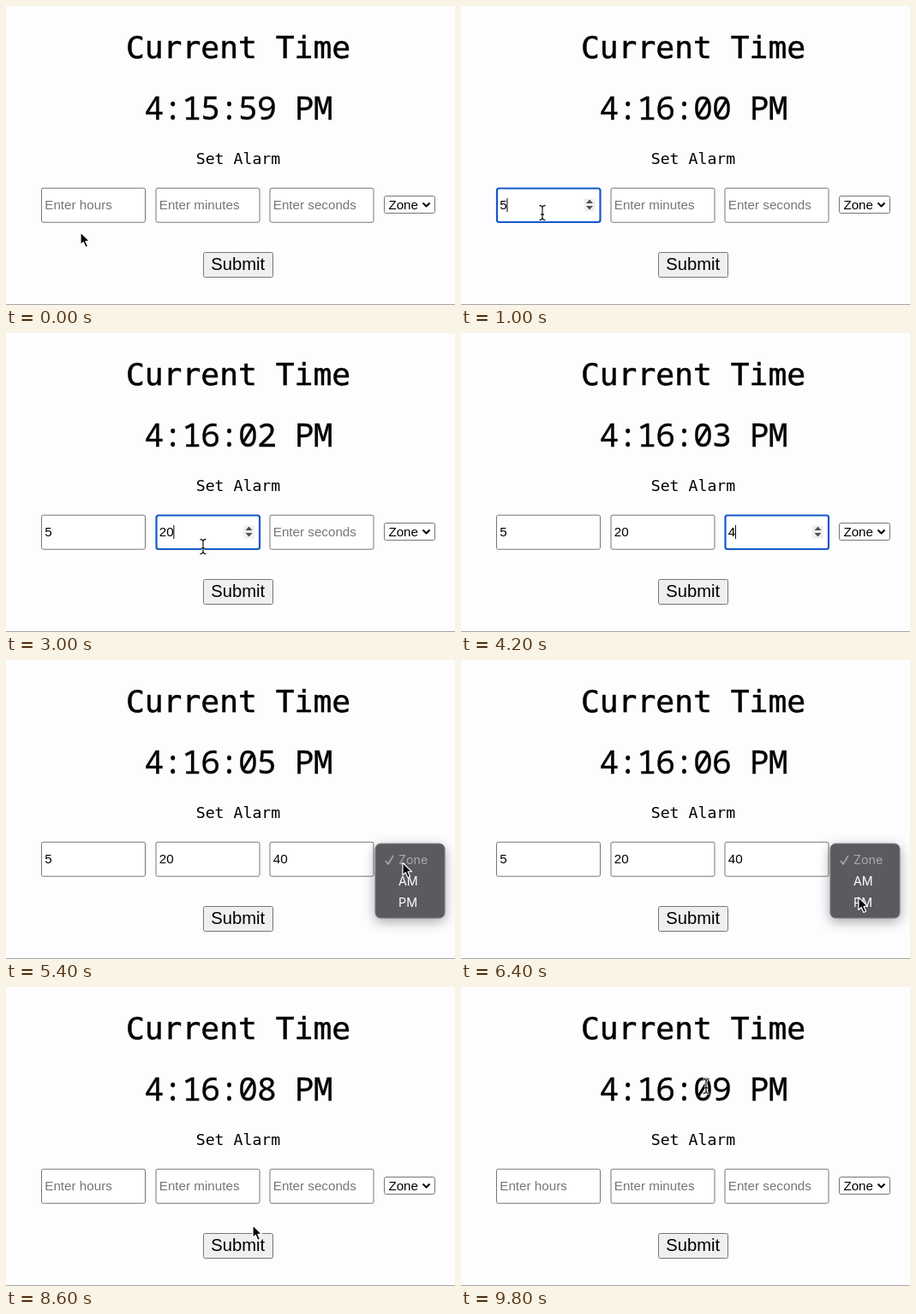
Recreate the animation shown at these times as an HTML page. Size 524 px wide and 350 px high, loop 10 s.

```html
<!DOCTYPE html>
<html lang="en">
<head>
<meta charset="utf-8">
<title>Alarm clock</title>
<style>
html, body { margin: 0; width: 100%; height: 100%; overflow: hidden; background: #fdfcfe; }
svg { display: block; }
text { font: 15.2px "Liberation Sans", Arial, sans-serif; white-space: pre; }
.mono { font-family: "DejaVu Sans Mono", monospace; font-size: 18.2px; text-anchor: middle; }
.title { font-size: 36.3px; stroke: #000; stroke-width: .5; }
.clock { font-family: "Noto Sans Mono", monospace; font-size: 38.2px; letter-spacing: -1px; stroke: #000; stroke-width: .3; }
.button { font-size: 20.2px; text-anchor: middle; }
.menu { font-family: Inter, "Open Sans", sans-serif; font-size: 14.3px; }
.shadow { filter: drop-shadow(0 4px 7px #0005); }
</style>
</head>
<body>
<svg id="stage" width="524" height="350" viewBox="0 0 524 350"></svg>
<script>
const LOOP = 10000, STEP = 200, MID = 271;
const stage = document.getElementById('stage');

const fields = [
  { x: 41, hint: 'Enter hours', focus: [400, 1400], keys: [[800, '5']] },
  { x: 174.5, hint: 'Enter minutes', focus: [1400, 3400], keys: [[2400, '2'], [2600, '20']] },
  { x: 307.5, hint: 'Enter seconds', focus: [3400, 5200], keys: [[4200, '4'], [4400, '40']] }
];

// Pointer runs of [time, x, y]; the pointer is hidden between runs, while typing.
const runs = [
  [[0, 87, 265], [200, 88, 257], [400, 90, 240], [600, 90, 240]],
  [[1000, 95, 242], [1200, 180, 260], [1400, 222, 247], [1600, 225, 250], [2200, 225, 250]],
  [[3000, 230, 250], [3200, 290, 258], [3400, 352, 246], [3800, 355, 243]],
  [[4600, 358, 245], [5000, 463, 236], [5600, 463, 238], [6200, 464, 278], [6600, 464, 278],
   [7000, 269, 306], [7400, 269, 306], [7800, 288, 279], [9000, 288, 279], [9800, 286, 116]]
];

const within = (v, a, b) => v >= a && v < b;
const text = (x, y, s, cls = '', fill = '#000') =>
  `<text x="${x}" y="${y}" class="${cls}" fill="${fill}">${s}</text>`;
const box = (x, y, w, h, fill, stroke, r = 2, line = 1) =>
  `<rect x="${x + .5}" y="${y + .5}" width="${w}" height="${h}" rx="${r}" fill="${fill}" stroke="${stroke}" stroke-width="${line}"/>`;
const path = (d, fill, stroke = 'none', line = 1) =>
  `<path d="${d}" fill="${fill}" stroke="${stroke}" stroke-width="${line}" stroke-linejoin="round"/>`;

function button(y, w, label) {
  return box(MID - .5 - w / 2, y, w, 29, '#efefef', '#767676') + text(MID - .3, y + 21, label, 'button');
}

function clock(t) {
  const sec = 59 + Math.floor((t + 600) / 1000);
  return `4:${15 + Math.floor(sec / 60)}:${String(sec % 60).padStart(2, '0')} PM`;
}

function field({ x, hint, focus, keys }, t, cleared) {
  const typed = cleared ? [] : keys.filter(k => k[0] <= t);
  const value = typed.length ? typed.at(-1)[1] : '';
  const active = within(t, ...focus);
  let out = active
    ? box(x + .5, 213, 120.5, 39.5, '#fff', '#1258c8', 2.5, 2.2)
    : box(x, 212.7, 121, 40, '#fff', '#767676');
  out += text(x + 4.3, 237.8, value || hint, '', value ? '#000' : '#757575');
  if (active) {
    const cx = x + 109, since = t - Math.max(focus[0], ...typed.map(k => k[0]));
    out += box(cx - 7, 225, 13, 15, '#efefef', 'none', 1) +
      path(`M${cx - 4} 231l4-4.5 4 4.5zM${cx - 4} 234l4 4.5 4-4.5z`, '#505050');
    if (since % 1000 < 500) {
      out += path(`M${x + 4.5 + value.length * 8.45} 225v16`, 'none', '#000');
    }
  }
  return out;
}

function menu() {
  return `<g class="shadow">${box(430.5, 214.5, 81, 87, '#5b5a5e', '#77767a', 6)}</g>` +
    path('M443 235l3 4 6-10', 'none', '#aaa', 1.5) +
    text(458, 239, 'Zone', 'menu', '#aaa') +
    text(458, 264, 'AM', 'menu', '#fff') + text(458, 289, 'PM', 'menu', '#fff');
}

function form(t) {
  const cleared = t >= 8400;
  const zone = !cleared && t >= 6600 ? 'PM' : 'Zone';
  return text(MID, 185, 'Set Alarm', 'mono') +
    fields.map(f => field(f, t, cleared)).join('') +
    box(441, 222, 59, 20, '#fff', '#767676') + text(446.4, 237.8, zone) +
    path('M486.5 230.5l4 4 4-4', 'none', '#000', 2) +
    button(288, 81, 'Submit') +
    (within(t, 5400, 6600) ? menu() : '');
}

function pointer(t) {
  const run = runs.find(r => within(t, r[0][0], r.at(-1)[0] + STEP));
  if (!run) return '';
  const i = Math.max(1, run.findIndex(k => k[0] >= t));
  const a = run[i - 1], b = run[i];
  const f = (t - a[0]) / (b[0] - a[0]);
  const x = a[1] + (b[1] - a[1]) * f, y = a[2] + (b[2] - a[2]) * f;
  const overField = within(y, 213, 254) && fields.some(p => within(x, p.x, p.x + 122));
  const overText = t > 9000 && (within(y, 168, 192) || within(y, 98, 142));
  if (overField || overText) {
    const beam = `M${x - 3.5} ${y - 8.5}q3.5 0 3.5 3v11q0 3-3.5 3M${x + 3.5} ${y - 8.5}q-3.5 0-3.5 3m0 11q0 3 3.5 3M${x - 2} ${y + 2}h4`;
    return path(beam, 'none', '#fff', 3) + path(beam, 'none', '#222', 1.3);
  }
  return path(`M${x} ${y}v14.5l3.3-3.1 2.6 6 2.7-1.2-2.6-5.8h4.6z`, '#000', '#fff', 1.2);
}

function draw(t) {
  const isSet = within(t, 7200, 8400), drop = isSet ? 31.5 : 0;
  stage.innerHTML =
    text(MID, 60.5 + drop, 'Current Time', 'mono title') +
    text(MID, 132.8 + drop, clock(t), 'mono clock') +
    (isSet
      ? text(MID, 216.5, 'Alarm set at time 5:20:40 PM', 'mono') + button(256, 124, 'Clear Alarm')
      : form(t)) +
    path('M0 349.5h524', 'none', '#a5a4a6') +
    pointer(t);
}

const start = performance.now();
let shown = -1;
function tick() {
  const t = Math.floor((performance.now() - start) % LOOP / STEP) * STEP;
  if (t !== shown) draw(shown = t);
  requestAnimationFrame(tick);
}
tick();
</script>
</body>
</html>
```
